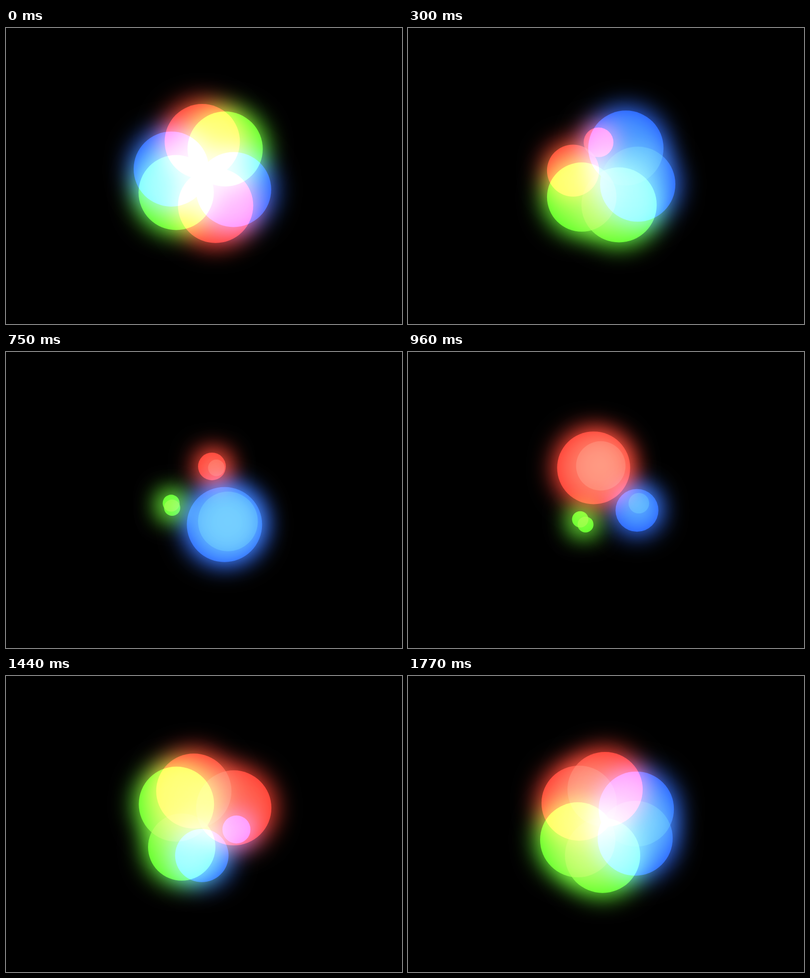
Write an HTML page with a canvas that moves like this. It is 800x600 px and loops after 1.8 s.

```html
<!DOCTYPE html>
<html>
<head>
<meta charset="utf-8">
<title>Orbiting lights</title>
<style>
  html, body { margin: 0; width: 100%; height: 100%; overflow: hidden; background: #000; }
  canvas { display: block; }
</style>
</head>
<body>
<canvas id="stage" width="800" height="600"></canvas>
<script>
const LOOP = 1800, STEP = 30, TAU = 2 * Math.PI;
const CENTER = { x: 400, y: 297 }, ORBIT = 67;
const FULL = 76, PINCH = 60;          // resting radius and how far it shrinks
const SPREAD = 8, SIGMA = 24;         // reach and softness of the glow
const OFFSTAGE = 2000;
const { sin, cos, exp } = Math;
const ctx = document.getElementById('stage').getContext('2d');

const blue  = { turn: 0,       fill: 'rgb(20,60,255)', glow: 'rgb(51,110,255)' };
const green = { turn: TAU / 3, fill: 'rgb(60,255,20)', glow: 'rgb(102,255,51)' };
const red   = { turn: -TAU / 3, fill: 'rgb(255,38,32)', glow: 'rgb(255,66,51)' };

// Each disc shrinks once per loop, around the time "at".
const trios = [
  {
    angle: swayAngle,
    discs: [
      { hue: red,   at: 530,  width: 320 },
      { hue: green, at: 880,  width: 470 },
      { hue: blue,  at: 1170, width: 390 }
    ]
  },
  {
    angle: spinAngle,
    discs: [
      { hue: red,   at: 635,  width: 340 },
      { hue: green, at: 865,  width: 312 },
      { hue: blue,  at: 1185, width: 255 }
    ]
  }
];

// Angles in degrees.
function swayAngle(t) {
  const p = TAU * t / LOOP;
  return 22 + 16 * sin(p) - 16 * sin(2 * p) + 5 * cos(3 * p);
}

// Fast at both ends of the loop, lingering in the middle.
function spinAngle(t) {
  const x = 2 * t / LOOP - 1;
  return 20 + 65 * x ** 2 + 250 * x ** 3 - 32 * sin(TAU * (x - 0.07) / 1.1);
}

function radius(disc, t) {
  return FULL - PINCH * exp(-(((t - disc.at) / disc.width) ** 4));
}

function circle(x, y, r) {
  ctx.beginPath();
  ctx.arc(x, y, r, 0, TAU);
  ctx.fill();
}

function drawLight(hue, x, y, r) {
  // Only the shadow of the offstage circle lands on the stage.
  ctx.shadowColor = hue.glow;
  ctx.shadowBlur = 2 * SIGMA;
  ctx.shadowOffsetX = OFFSTAGE;
  ctx.fillStyle = '#000';
  circle(x - OFFSTAGE, y, r + SPREAD);

  ctx.shadowColor = 'transparent';
  ctx.fillStyle = hue.fill;
  circle(x, y, r);
}

function draw(t) {
  ctx.globalCompositeOperation = 'source-over';
  ctx.shadowColor = 'transparent';
  ctx.fillStyle = '#000';
  ctx.fillRect(0, 0, 800, 600);
  ctx.globalCompositeOperation = 'screen';
  for (const { angle, discs } of trios) {
    const base = angle(t) * TAU / 360;
    for (const disc of discs) {
      const a = base + disc.hue.turn;
      drawLight(disc.hue, CENTER.x + ORBIT * cos(a), CENTER.y + ORBIT * sin(a), radius(disc, t));
    }
  }
}

let start = null;
function tick(now) {
  if (start === null) start = now;
  const t = (now - start) % LOOP;
  draw(Math.floor(t / STEP) * STEP);
  requestAnimationFrame(tick);
}
draw(0);
requestAnimationFrame(tick);
</script>
</body>
</html>
```
